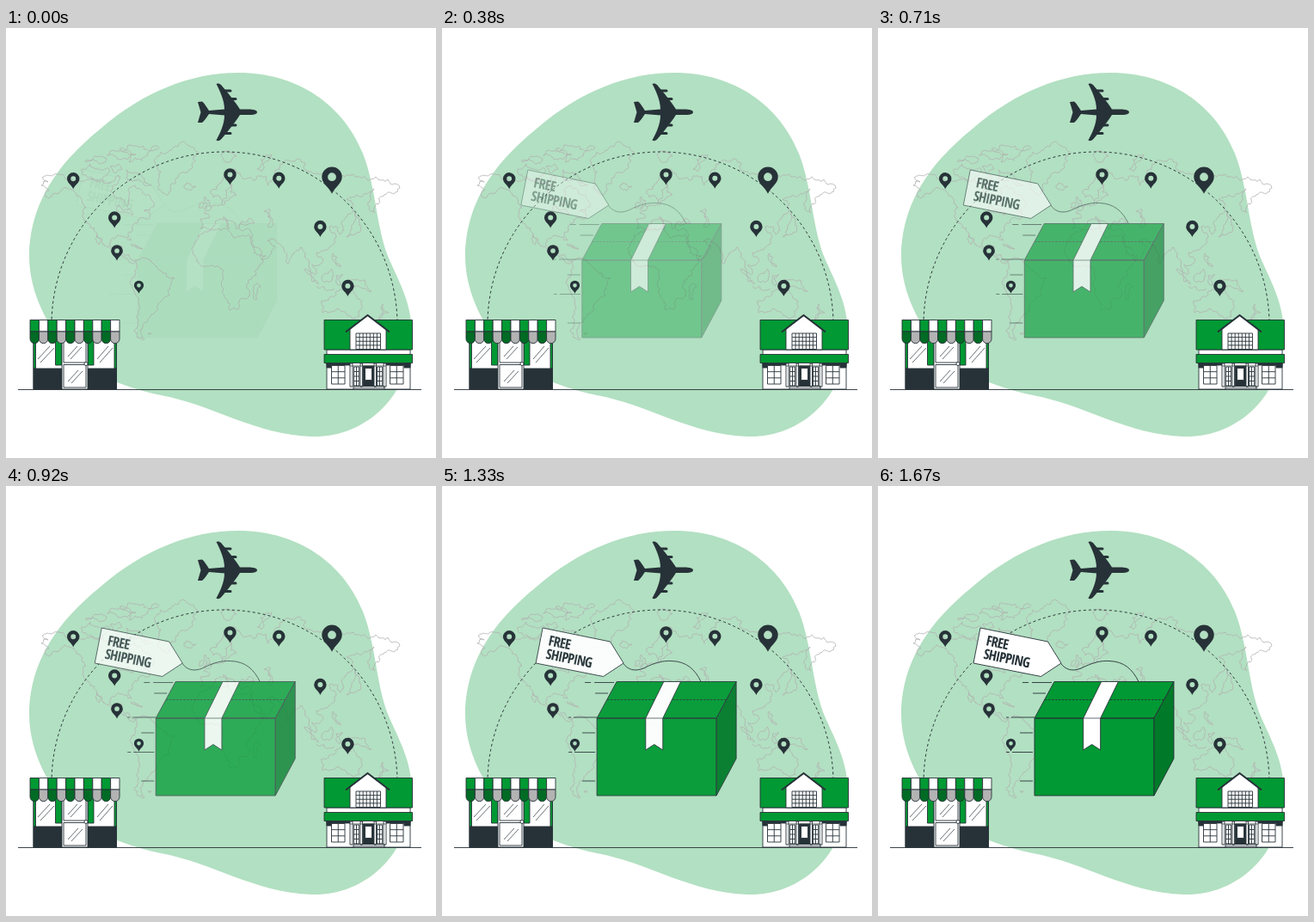
These frames come from a looping animation (500 by 500 pixels, 1.71 s). An HTML page:

```html
<!DOCTYPE html>
<html lang="en">
<head>
<meta charset="utf-8">
<title>Free shipping</title>
<style>
  html, body { margin: 0; width: 100%; height: 100%; overflow: hidden; background: #fff; }
  svg { display: block; width: 100%; height: 100%; }
  .ink { stroke: #263238; stroke-width: .9; fill: none; }
  .green { fill: #093; }
  .white { fill: #fff; }
  .dark { fill: #263238; }
  .thin { stroke-width: .7; }
  .eaves { stroke-width: 2; }
  #coasts { fill: none; stroke: #b1b1b1; stroke-width: .8; stroke-linejoin: round; }
  #label {
    font: bold 16px "Open Sans Condensed", "Roboto Condensed", Roboto, "Open Sans", sans-serif;
    font-stretch: condensed; letter-spacing: -.05em; fill: #263238;
  }
</style>
</head>
<body>
<svg viewBox="0 0 500 500">
  <path fill="#b2e0c2" d="M27 265C28 195 70 150 110 117C160 74 215 52 270 52C341 52 393 91 415 146C431 187 430 233 446 270C461 303 473 325 472 362C468 432 415 477 355 475C290 473 240 438 180 427C130 416 95 400 70 372C43 339 27 302 27 265Z"/>

  <g id="coasts">
    <!-- the Americas -->
    <polyline points="41,183 49,179 42,174 48,171 62,170 76,175 90,178 104,177 118,181 125,178 132,172 130,181 122,190 127,197 137,200 140,207 143,198 142,188 150,183 157,188 162,194 170,201 172,208 160,213 168,217 156,221 148,229 143,237 146,247 140,243 128,243 122,249 127,258 134,253 135,261 143,264 147,271 151,270"/>
    <polyline points="41,183 50,189 46,196 57,192 68,185 79,189 87,198 93,209 91,221 98,232 104,245 108,252 106,241 114,253 124,261 137,267 147,274 151,270"/>
    <polyline points="151,270 159,267 168,270 176,278 186,285 196,291 191,300 190,311 181,317 177,327 169,333 165,341 159,347 157,356 161,362 153,360 149,352 152,337 154,319 149,306 144,295 150,283 151,270"/>
    <polyline points="145,251 153,253 159,257 151,255 145,251"/>
    <polyline points="129,207 135,210 141,211 148,217 139,214 131,213 129,207"/>
    <polyline points="165,355 169,355 167,356.5 165,355"/>
    <!-- northern islands -->
    <polyline points="88,164 98,158 107,164 119,163 114,172 100,175 90,171 88,164"/>
    <polyline points="140,165 151,168 161,175 169,183 160,182 150,177 140,174 140,165"/>
    <polyline points="121,161 131,158 135,164 127,169 121,161"/>
    <polyline points="92,155 103,149 117,152 109,158 92,155"/>
    <polyline points="118,149 132,143 146,148 135,153 118,149"/>
    <polyline points="132,141 152,137 178,139 165,145 158,154 143,156 151,147 132,141"/>
    <polyline points="172,154 180,144 195,139 213,137 223,144 220,155 213,165 200,174 191,183 187,195 181,190 177,178 180,167 172,154"/>
    <polyline points="207,183 214,181 221,184 216,188 209,187 207,183"/>
    <polyline points="250,148 260,144 268,149 260,156 254,155 250,148"/>
    <polyline points="292,164 296,153 309,147 303,155 298,166 292,164"/>
    <!-- Europe and Africa -->
    <polyline points="231,196 236,200 239,208 230,211 234,204 231,196"/>
    <polyline points="225,204 230,203 228,209 224,209 225,204"/>
    <polyline points="290,177 280,175 272,169 262,165 253,171 247,182 238,189 241,197 247,195 251,204 257,196 255,189 262,181 261,191 268,194 259,200 252,206 243,206 237,212 230,215 236,221 226,222 226,233 235,234 243,225 251,223 259,234 257,226 252,220 260,224 268,234 273,227 282,222 289,227 279,229 271,230 274,236 284,235 286,243"/>
    <polyline points="286,243 275,241 265,244 258,235 244,234 230,237 221,249 217,262 225,274 238,276 248,278 253,289 252,302 257,316 260,328 270,327 279,315 283,305 282,293 293,278 302,265 292,264 285,250 283,243"/>
    <polyline points="292,297 296,301 292,315 288,315 287,306 292,297"/>
    <polyline points="300,213 307,211 305,220 311,229 304,230 300,213"/>
    <!-- Asia and Oceania -->
    <polyline points="286,243 291,255 297,269 309,262 313,254 304,247 318,251 323,257 328,274 333,264 342,255 348,262 352,277 359,287 356,275 364,276 368,268 361,261 373,258 382,248 382,238 376,231 386,232 388,240 393,235 390,226 401,216 404,205 396,199 407,194 421,192 428,187 424,199 429,215 434,200 444,191 451,193 458,186 449,182 437,177 423,177 408,173 392,172 380,167 364,170 347,164 348,157 334,155 318,165 311,173 305,183 302,172 290,177"/>
    <polyline points="406,214 410,221 413,231 405,240 396,243 402,234 405,225 406,214"/>
    <polyline points="347,280 355,288 363,298 356,295 347,280"/>
    <polyline points="369,287 378,280 380,289 376,296 369,295 369,287"/>
    <polyline points="361,300 370,301 382,303"/>
    <polyline points="384,288 391,286 386,291 389,299 384,295 384,288"/>
    <polyline points="380,262 385,267 389,278 382,272 380,262"/>
    <polyline points="398,292 407,293 419,300 425,306 415,303 404,301 398,292"/>
    <polyline points="366,318 376,313 384,306 393,305 397,311 403,304 408,314 414,324 411,335 402,337 394,330 384,327 374,331 368,331 366,318"/>
    <polyline points="402,341 407,341 404,346 402,341"/>
    <polyline points="438,321 445,331 435,338 426,343 438,332 438,321"/>
  </g>

  <path class="ink" style="stroke-width:1" stroke-dasharray="3 3" d="M53 339.5V345A201 201 0 0 1 455 345V339.5"/>
  <g id="pins" class="dark" fill-rule="evenodd"></g>

  <!-- plane -->
  <g class="dark" transform="translate(0 -.4)">
    <path d="M292 98.3C292 95.8 287 95 282 95H272C268 88 258 76 250 66.5C248 64.5 246 64.5 244.5 65.5C249 74 254 85 254 95L236 96.5C233 92 230 87 228 86L223 86.5L226.5 98.3L223 110.5L228 110.5C230 109 233 105 236 100.5L254 102C254 112 249 123 244.5 131C246 132 248 132 250 130C258 121 268 108 272 101.5H282C287 101.5 292 100.8 292 98.3Z"/>
    <path d="M253 72h8a1.5 1.5 0 0 1 0 3h-6zM259 81.5h8a1.5 1.5 0 0 1 0 3h-6zM253 124.5h8a1.5 1.5 0 0 0 0-3h-6zM259 115h8a1.5 1.5 0 0 0 0-3h-6z"/>
  </g>

  <path class="ink" d="M14 420.5H483"/>

  <!-- shop -->
  <g class="ink">
    <path class="white" d="M32 360H128.5V420H32Z"/>
    <path class="green" d="M32 360H34.5V396H32ZM57.5 360H65V392H57.5ZM95 360H102V392H95ZM126 360H128.5V396H126Z"/>
    <path class="dark" d="M32 396H65V420H32ZM95 396H128.5V420H95Z"/>
    <path class="white" d="M65 360H95V420H65ZM67 362H93V389H67ZM67 391.5H93V418H67Z"/>
    <path class="thin" d="M37 385L51 370M40 389L56 372M106 385L119 370M109 389L124 372M72 382L83 370M75 385L88 371M72 411L84 398M76 413L89 399"/>
    <circle class="white" cx="93" cy="390.5" r="2"/>
    <g id="awning"></g>
  </g>

  <!-- house -->
  <g class="ink">
    <path class="white" d="M373 374H470V420H373Z"/>
    <path class="green" d="M370 339.5H472.5V374H370ZM370 379.5H472.5V389.5H370Z"/>
    <path class="white" d="M400 374V350L420.5 334L442 350V374Z"/>
    <path class="eaves" d="M395 353.5L420.5 334L446 353.5"/>
    <path class="dark" d="M373 390H400V392H373ZM442 390H470V392H442ZM373 390H379V395H373ZM463 390H470V395H463ZM415.5 393H427.5V417H415.5Z"/>
    <path class="white" d="M417.5 395.5H425.5V409.5H417.5ZM400 390H403V417H400ZM412 390H414.5V417H412ZM428 390H430.5V417H428ZM439 390H442V417H439ZM404 416.5H440V420H404Z"/>
    <path class="thin" d="M400 393H442M404 418.3H440"/>
    <g id="windows"></g>
  </g>

  <!-- parcel, tag and speed lines -->
  <g id="parcel" class="ink">
    <path d="M168 228.5H175M179 228.5H202M180 241H195M149 269H152M155 269H182M165 287H180M149 309.5H153M156 309.5H180M165 343H180"/>
    <path class="green" d="M182 270L205 227.5H344L321 270ZM182 270H321V360H182Z"/>
    <path fill="#007a29" d="M321 270L344 227.5V317L321 360Z"/>
    <path stroke-dasharray="2.5 1.5" d="M194 248.5H332"/>
    <path class="white" d="M238.7 270L259.7 227.5H279.5L258.7 270V307L248.700 300.5L238.7 307Z"/>
    <path class="thin" d="M238.7 270H258.7"/>
    <path d="M212 205.5C218 214 226 216 236 212C250 205 259 203 269 203.5C286 204 296 213 303 227.5"/>
    <path class="white" d="M119 165L197.5 181L213 206L189.5 221.500L111 206Z"/>
    <g id="label" stroke="none">
      <text transform="translate(125 185) rotate(11.6)">FREE</text>
      <text transform="translate(122 200.5) rotate(11.6)">SHIPPING</text>
    </g>
  </g>
</svg>

<script>
const $ = id => document.getElementById(id);

let seed = 7;
const random = () => (seed = seed * 16807 % 2147483647) / 2147483647;

// Midpoint displacement turns a straight edge into a ragged shoreline.
function roughen([ax, ay], [bx, by]) {
  const dx = bx - ax, dy = by - ay;
  if (Math.hypot(dx, dy) < 3) return [[bx, by]];
  const push = (random() - .5) * .6;
  const mid = [(ax + bx) / 2 - dy * push, (ay + by) / 2 + dx * push];
  return [...roughen([ax, ay], mid), ...roughen(mid, [bx, by])];
}
for (const line of document.querySelectorAll('#coasts polyline')) {
  const points = line.getAttribute('points').split(' ').map(p => p.split(',').map(Number));
  const rough = points.flatMap((p, i) => i ? roughen(points[i - 1], p) : [p]);
  line.setAttribute('points', rough.map(p => p.map(v => v.toFixed(1))).join(' '));
}

const pins = [[78.2, 175.3, 1], [126.2, 220.5, 1], [129, 259, .95], [154.5, 299.3, .78], [260.5, 170.4, 1],
  [317.3, 174.8, 1], [379, 173.2, 1.63], [365.4, 231, 1], [397.4, 300, 1]];
$('pins').innerHTML = pins.map(([x, y, s]) =>
  `<path transform="translate(${x} ${y}) scale(${s})" d="M0 12C-2 7-7.2 5-7.2 0a7.2 7.2 0 0 1 14.4 0C7.2 5 2 7 0 12ZM-3 0a3 3 0 0 0 6 0a3 3 0 0 0-6 0Z"/>`).join('');

$('awning').innerHTML = Array.from({ length: 10 }, (_, i) => {
  const x = 28 + i * 10.4, [top, flap] = i % 2 ? ['#fff', '#b3b3b3'] : ['#093', '#006b24'];
  return `<path fill="${top}" d="M${x} 339.5h10.4v13.5h-10.4z"/>
    <path fill="${flap}" d="M${x} 353h10.4v8.5a5.2 5.2 0 0 1-10.4 0z"/>`;
}).join('');

function paneWindow(x, y, w, h, columns, rows) {
  let d = `M${x} ${y}h${w}v${h}h${-w}z`;
  for (let i = 1; i < columns; i++) d += `M${x + w * i / columns} ${y}v${h}`;
  for (let i = 1; i < rows; i++) d += `M${x} ${y + h * i / rows}h${w}`;
  return `<path class="white" d="${d}"/>`;
}
$('windows').innerHTML = paneWindow(407, 355, 28.5, 18.5, 7, 4) +
  paneWindow(378.5, 392.5, 15.5, 21.5, 2, 3) + paneWindow(446.5, 392.5, 15.5, 21.5, 2, 3) +
  paneWindow(404.5, 394, 6, 22, 2, 4) + paneWindow(431.5, 394, 6, 22, 2, 4);

// Pick the type size at which the longer word has the tag's line length.
const word = $('label').lastElementChild;
$('label').style.fontSize = 16 * 54 / word.getComputedTextLength() + 'px';

// cubic-bezier(0, 0, .58, 1), solved by bisection
function easeOut(x) {
  let low = 0, high = 1;
  for (let i = 0; i < 30; i++) {
    const s = (low + high) / 2;
    if (1.74 * (1 - s) * s * s + s ** 3 < x) low = s; else high = s;
  }
  return 3 * (1 - low) * low * low + low ** 3;
}

const LOOP = 1710, STEPS = 41, start = performance.now();
function draw() {
  const time = (performance.now() - start) % LOOP;
  const step = Math.min(STEPS - 1, Math.floor((time + 5) * 24 / 1000));
  const progress = easeOut((step + .75) / STEPS);
  $('parcel').setAttribute('transform', `translate(${30 * (progress - 1)} 0)`);
  $('parcel').setAttribute('opacity', progress);
  requestAnimationFrame(draw);
}
draw();
</script>
</body>
</html>
```
